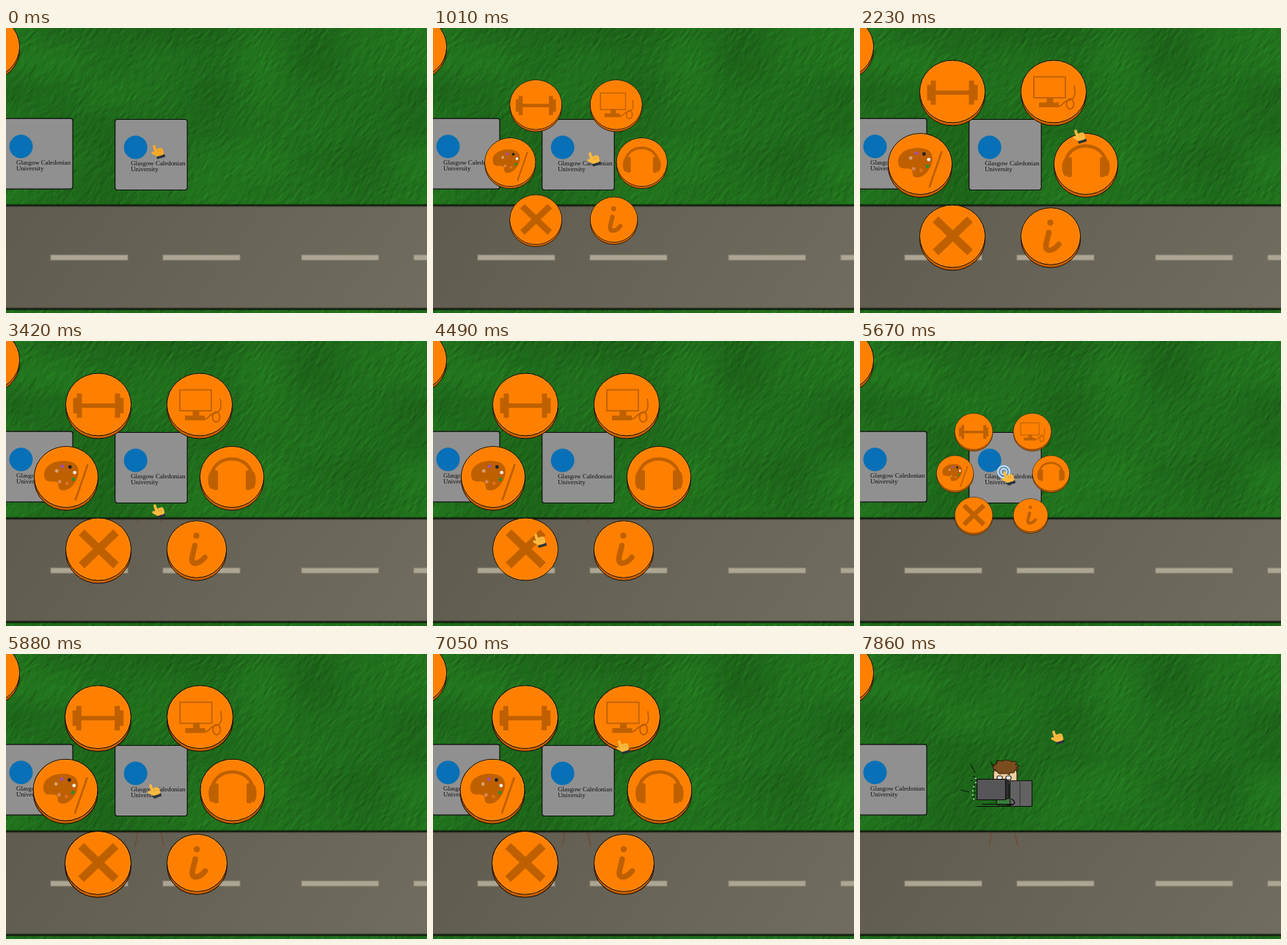
These frames come from a looping animation (574x388 px, 8000 ms). An HTML page with a canvas:

```html
<!DOCTYPE html>
<html lang="en">
<head>
<meta charset="utf-8">
<title>Campus menu</title>
<style>
html, body { margin: 0; width: 100%; height: 100%; overflow: hidden; background: #1f6b1c; }
canvas { display: block; }
</style>
</head>
<body>
<canvas id="stage" width="574" height="388"></canvas>
<script>
const W = 574, H = 388, LOOP = 8000;
const g = document.getElementById('stage').getContext('2d');
const ICON = '#bf6000', FACE = '#ff8000', RIM = '#c96200', INK = '#0c0c0c';

// ---------- helpers ----------
function oval(c, x, y, rx, ry, fill, stroke, w = 1) {
  c.beginPath();
  c.ellipse(x, y, rx, ry, 0, 0, 7);
  if (fill) { c.fillStyle = fill; c.fill(); }
  if (stroke) { c.strokeStyle = stroke; c.lineWidth = w; c.stroke(); }
}

function box(c, x, y, w, h, r, fill, stroke) {
  c.beginPath();
  c.roundRect(x, y, w, h, r);
  c.fillStyle = fill;
  c.fill();
  if (stroke) { c.strokeStyle = stroke; c.lineWidth = 1.2; c.stroke(); }
}

function curve(c, path, color, w) {
  c.strokeStyle = color;
  c.lineWidth = w;
  c.stroke(new Path2D(path));
}

function hash(x, y) {
  let h = Math.imul(x, 374761393) + Math.imul(y, 668265263) + 977;
  h = Math.imul(h ^ (h >>> 13), 1274126177);
  return ((h ^ (h >>> 16)) >>> 0) / 4294967296;
}

function noise(x, y) {
  const i = Math.floor(x), j = Math.floor(y);
  let a = x - i, b = y - j;
  a *= a * (3 - 2 * a);
  b *= b * (3 - 2 * b);
  const p = hash(i, j), q = hash(i, j + 1);
  const top = p + (hash(i + 1, j) - p) * a;
  const low = q + (hash(i + 1, j + 1) - q) * a;
  return top + (low - top) * b;
}

// ---------- scenery, painted once ----------
function blades(x, y) {
  const bend = noise(x / 26, y / 26) * 7;
  const u = x * 0.6 - y * 0.8, v = x * 0.8 + y * 0.6 + bend;
  return noise(u / 10, v / 4) + 0.4 * noise(u / 4 + 40, v / 2);
}

function paintGrass(c) {
  const img = c.createImageData(W, H);
  for (let y = 0; y < H; y++) {
    for (let x = 0; x < W; x++) {
      const slope = blades(x, y) - blades(x + 1, y + 1);
      const patch = noise(x / 70 + 9, y / 45);
      const glow = y < 245 ? Math.max(0, y - 170) / 75 * 0.08 * x / W : 0;
      const k = 0.87 + patch * 0.17 + slope * 0.28 + glow;
      const o = (y * W + x) * 4;
      img.data[o] = 33 * k;
      img.data[o + 1] = 113 * k;
      img.data[o + 2] = 29 * k;
      img.data[o + 3] = 255;
    }
  }
  c.putImageData(img, 0, 0);
}

function paintRoad(c) {
  const tone = c.createLinearGradient(60, 150, 510, 470);
  tone.addColorStop(0, '#5f5b4f');
  tone.addColorStop(1, '#706c5f');
  c.fillStyle = tone;
  c.fillRect(0, 242, W, 140);
  for (const y of [239, 380]) {
    const edge = c.createLinearGradient(0, y, 0, y + 5);
    edge.addColorStop(0, 'rgba(10,22,8,0)');
    edge.addColorStop(0.5, 'rgba(12,18,8,.95)');
    edge.addColorStop(1, 'rgba(20,20,14,0)');
    c.fillStyle = edge;
    c.fillRect(0, y, W, 5);
  }
  for (const x of [61, 214, 403, 556]) {
    c.fillStyle = '#8d8675';
    c.fillRect(x - 0.5, 308.5, 106, 8);
    c.fillStyle = '#aea694';
    c.fillRect(x + 0.5, 309.5, 104, 6);
  }
}

function card(c, x, y) {
  box(c, x, y, 98.5, 96, 3, '#909090', INK);
  oval(c, x + 28, y + 38, 16, 16, '#0870b6');
  c.fillStyle = '#111';
  c.font = '8.9px "Liberation Serif", serif';
  c.fillText('Glasgow Caledonian', x + 21.5, y + 62.3);
  c.fillText('University', x + 21.5, y + 70.3);
}

function button(c, r, x, y, pressed) {
  const ry = r * 0.943;
  if (!pressed) oval(c, x, y + 4, r - 0.5, ry, RIM, '#1a0d00');
  oval(c, x, y, r - 0.5, ry, FACE, '#1a0d00');
  oval(c, x, y, r - 1.8, ry - 1.3, null, '#ff8c1a');
}

const scene = document.createElement('canvas');
scene.width = W;
scene.height = H;
const s = scene.getContext('2d');
paintGrass(s);
paintRoad(s);
card(s, -7.5, 123.2);
button(s, 45, -26, 25.5);

// ---------- menu icons, relative to the button centre ----------
function dumbbell(c) {
  c.fillStyle = ICON;
  c.fillRect(-26, -1.5, 52, 6);
  for (const m of [-1, 1]) {
    c.fillRect(m * 26 - 3.5, -15, 7, 33);
    c.fillRect(m * 31.5 - 3, -9, 6, 21);
  }
}

function computer(c) {
  c.strokeStyle = ICON;
  c.lineWidth = 1.8;
  c.strokeRect(-27, -20, 43, 28.5);
  c.fillStyle = ICON;
  c.fillRect(-9.5, 8, 9, 8);
  c.fillRect(-20, 15, 27, 6.5);
  curve(c, 'M5 20C13 21 12 13 20 12C30 10 30 3 28 -8', ICON, 1.8);
  oval(c, 22.5, 17, 5, 7, null, ICON, 2);
}

function headphones(c) {
  curve(c, 'M-28 4C-30 -34 29 -34 28 4', ICON, 4.5);
  for (const m of [-1, 1]) {
    box(c, m * 22.5 - 3.5, -9, 7, 27, 2, ICON);
    oval(c, m * 28, 4.5, 4.5, 12, ICON);
  }
}

function palette(c) {
  c.fillStyle = ICON;
  c.fill(new Path2D('M-30 -3C-30 -20 -6 -25 8 -20C20 -16 18 -2 13 6C8 15 0 20 -7 18C-13 16 -8 9 -13 7C-19 5 -30 10 -30 -3Z'));
  const paints = ['#d8a070', '#a050b0', '#20202c', '#f4f0e6', '#2c8a30', '#e07020', '#d88850'];
  paints.forEach((col, i) => {
    const a = (i - 3.3) * 0.82;
    oval(c, -1 + 13 * Math.cos(a), -3 + 12 * Math.sin(a), 2.4, 2.4, col);
  });
  curve(c, 'M29.5 -17L12.5 32', ICON, 2.8);
}

function cross(c) {
  curve(c, 'M-23 -23L24 22M24 -23L-23 22', ICON, 11);
}

function info(c) {
  oval(c, -0.5, -18.5, 4.2, 4.2, ICON);
  c.lineCap = 'round';
  curve(c, 'M-2.5 -5C-4 4 -11 19 -2 19C3 19 7 16 11 11', ICON, 7.5);
  c.lineCap = 'butt';
}

// ---------- menu: three rows, one button on each side ----------
const items = [
  { icon: dumbbell, side: -1, row: -1, r: 45 },
  { icon: computer, side: 1, row: -1, r: 45, down: 7510 },
  { icon: headphones, side: 1, row: 0, r: 44 },
  { icon: info, side: 1, row: 1, r: 41 },
  { icon: cross, side: -1, row: 1, r: 45, down: 4250 },
  { icon: palette, side: -1, row: 0, r: 44 }
];
const shows = [
  { from: 770, open: 1060, to: 4510, size: 1, grow: 310 },
  { from: 5410, open: 5880, to: 7860, size: 1.008, grow: 465 }
];

function menu(t) {
  const show = shows.find(m => t >= m.from && t < m.to);
  if (!show) return;
  const k = t < show.open ? 0.02 + (t - show.from) / show.grow : show.size;
  g.save();
  g.translate(195, 173.3);
  g.scale(k, k);
  for (const { icon, side, row, r, down } of items) {
    g.save();
    g.translate(side * (r + (row ? 24 : 69)), 11.7 + row * 98.5);
    button(g, r, 0, 0, t >= down && down > show.from);
    icon(g);
    g.restore();
  }
  g.restore();
}

// ---------- worker at the desk ----------
function worker() {
  box(g, 182, 154, 32, 26, 8, '#f2cfa0', '#2a1a0c');
  g.beginPath();
  for (let i = 0; i < 44; i++) {
    const a = i / 44 * Math.PI * 2, k = 0.78 + 0.3 * hash(i, 3);
    g.lineTo(198.5 + 18 * k * Math.cos(a), 154 + 10.5 * k * Math.sin(a));
  }
  g.closePath();
  g.fillStyle = '#7b4d1e';
  g.fill();
  g.strokeStyle = '#2a1808';
  g.lineWidth = 1;
  g.stroke();
  for (const x of [187, 199]) box(g, x, 166, 7, 5, 2, '#fff', '#222');
  box(g, 186, 178, 28, 28, 4, '#3a7d3c', INK);
  box(g, 204.5, 172.5, 30, 35, 0, '#626262', '#161616');
  box(g, 198, 172, 5, 25, 1, '#303032', INK);
  box(g, 159.5, 170.5, 39, 28, 0, '#565658', INK);
  curve(g, 'M218 172V207', '#333', 1);
  curve(g, 'M159 207.5H235M166 204.5H208M206 197C214 202 212 206 200 206', INK, 1.2);
  curve(g, 'M137 185L149 188M151 150L157 162M181 152L178 146M185 150L188 144', INK, 1);
  for (let i = 0; i < 12; i++) {
    g.fillStyle = i % 2 ? '#d8e0d4' : INK;
    g.fillRect(151 + 6 * hash(i, 8), 166 + i * 2.8, 2, 1.3);
  }
}

// ---------- small marks at the kerb ----------
function marks(t) {
  if (t < 1000 || (t >= 4510 && t < 5880)) return;
  const len = t < 4510 ? 3 : 19;
  const left = t < 3850 || t >= 5880;
  for (const x of left ? [179.5, 211] : [211]) {
    curve(g, `M${x} 243l${(x > 200 ? 0.22 : -0.18) * len} ${len}`, 'rgba(122,58,28,.6)', 1.3);
  }
}

// ---------- pointer: each move is start, end, x, y ----------
const moves = [
  [80, 430, 210, 167], [1890, 2230, 290, 136], [2230, 2340, 343, 132],
  [3050, 3520, 160, 244], [3640, 3850, 177, 245], [3850, 4250, 136, 260],
  [4680, 5020, 193, 175], [6260, 7080, 252, 113], [7100, 7260, 260, 102]
];
const clicks = [[770, 990], [2660, 2880], [5410, 5690]];

function pointerAt(t) {
  let x = 198, y = 157;
  for (const [a, b, tx, ty] of moves) {
    const k = Math.min(1, Math.max(0, (t - a) / (b - a)));
    x += (tx - x) * k;
    y += (ty - y) * k;
  }
  return [x, y];
}

function pointer(t) {
  const [x, y] = pointerAt(t);
  const skin = t < 400 ? '#f5a928' : '#fbb940';
  g.save();
  g.translate(x, y);
  if (clicks.some(([a, b]) => t >= a && t < b)) {
    for (const r of [8, 4]) {
      oval(g, 3, 3, r, r, null, '#5c9ed6', 3);
      oval(g, 3, 3, r, r, null, '#e4f0fa', 1.4);
    }
  }
  g.translate(10.8, 12);
  g.rotate(-0.3);
  box(g, -5.3, 4.5, 11.5, 4, 0.5, '#28323c');
  box(g, -6, -5, 12, 10, 3, skin);
  g.lineCap = 'round';
  curve(g, 'M-4.2 -9.5V0M-8.5 -1.5L-4 2.5', skin, 3.7);
  g.lineCap = 'butt';
  curve(g, 'M-1 -3V0M2 -3V0', 'rgba(170,105,20,.4)', 0.8);
  g.restore();
}

function draw(t) {
  g.drawImage(scene, 0, 0);
  marks(t);
  if (t < 7860) card(g, 148.7, 124.5);
  else worker();
  menu(t);
  pointer(t);
}

let start;
function tick(now) {
  start ??= now;
  draw((now - start) % LOOP);
  requestAnimationFrame(tick);
}
draw(0);
requestAnimationFrame(tick);
</script>
</body>
</html>
```
